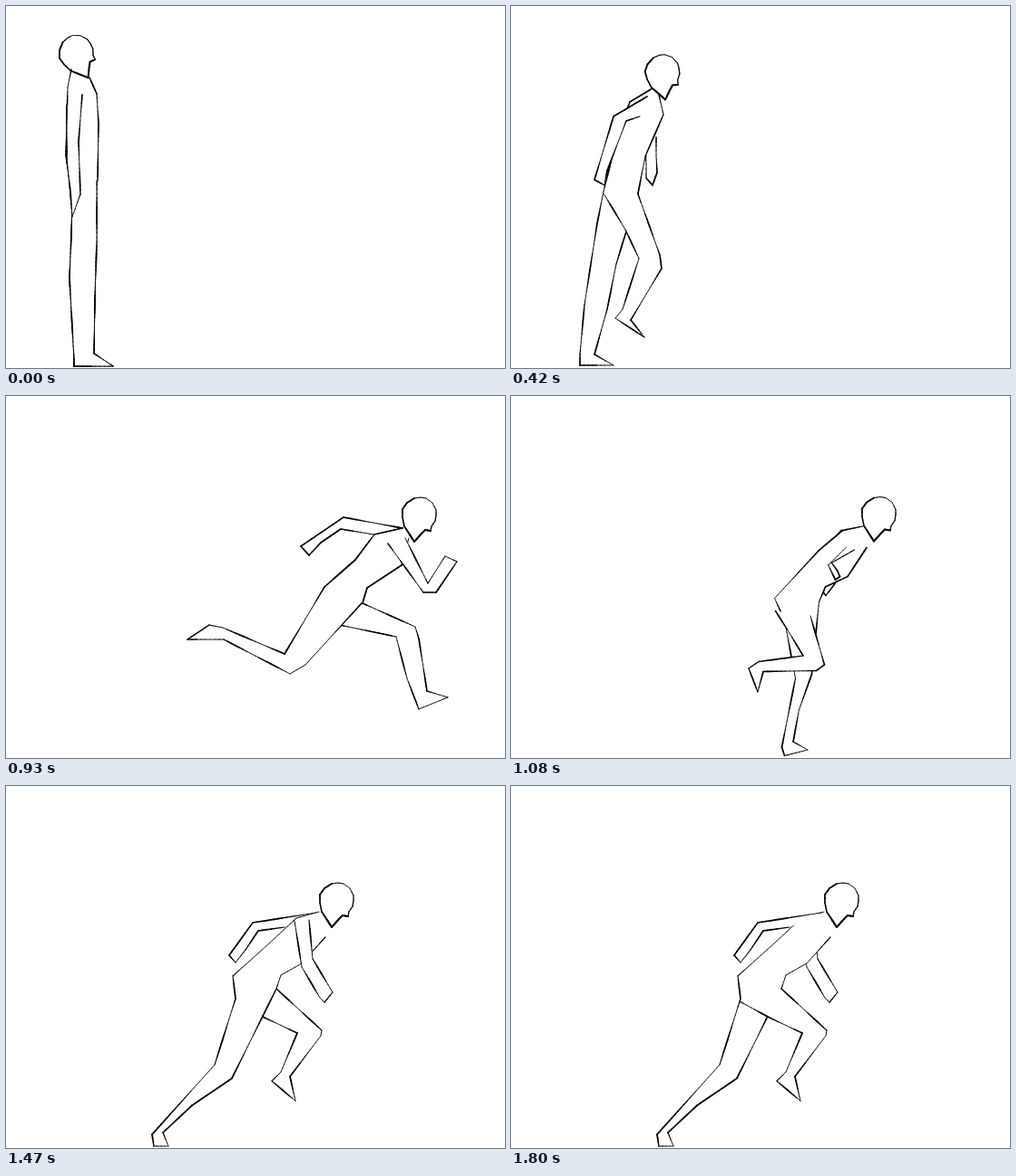
Animation, 550 px wide and 400 px high, one loop 1.86 s. Source, as an HTML page with a canvas:

```html
<!DOCTYPE html>
<html lang="en">
<head>
<meta charset="utf-8">
<title>Sprint</title>
<style>
html, body { margin: 0; overflow: hidden; background: #fff; }
canvas { display: block; }
</style>
</head>
<body>
<canvas id="stage" width="550" height="400"></canvas>
<script>
const ctx = document.getElementById('stage').getContext('2d');

// Limbs run down the back edge and up the front edge; side A is the pushing leg.
const stand = {
  head: [80, 56, -0.62],
  back: [72, 70, 68, 90, 66, 165, 73, 215],
  front: [101, 193, 102, 130, 100, 97, 92, 79],
  armA: [67, 110, 67, 170, 71, 205, 73, 233, 82, 208, 80, 150, 84, 98],
  legA: [73, 215, 72, 255, 70, 300, 75, 390, 75, 398, 118, 398, 97, 384, 98, 320, 100, 260, 100, 193]
};
stand.armB = stand.armA;
stand.legB = stand.legA;

const crouch = {
  head: [168, 78, -0.28],
  back: [156, 91, 131, 106, 118, 140, 102, 205],
  front: [139, 212, 148, 166, 168, 120, 163, 98],
  armA: [148, 150, 149, 175, 149, 190, 156, 198, 161, 184, 160, 165, 160, 145],
  armB: [150, 100, 113, 122, 92, 192, 103, 198, 106, 182, 127, 127, 142, 122],
  legA: [102, 205, 95, 240, 81, 330, 76, 385, 76, 397, 113, 397, 92, 385, 106, 335, 116, 285, 139, 210],
  legB: [102, 207, 126, 247, 141, 279, 123, 335, 115, 345, 147, 366, 132, 347, 166, 290, 164, 275, 140, 208]
};

const contact = {
  head: [446, 140, 0],
  back: [430, 149, 411, 151, 389, 167, 331, 237],
  front: [381, 231, 390, 213, 416, 203, 432, 168],
  armA: [410, 148, 358, 153, 335, 190, 343, 202, 354, 187, 365, 162, 391, 161],
  armB: [415, 200, 427, 222, 469, 219, 472, 204, 456, 206, 428, 207, 432, 178],
  legA: [331, 237, 350, 260, 397, 316, 436, 391, 440, 397, 475, 384, 449, 381, 430, 340, 414, 292, 381, 231],
  legB: [331, 237, 329, 268, 323, 301, 243, 271, 231, 276, 225, 306, 243, 288, 326, 331, 343, 324, 362, 262]
};

const push = {
  head: [364, 131, 0],
  back: [345, 139, 320, 146, 290, 174, 250, 210],
  front: [298, 224, 303, 209, 326, 196, 352, 167],
  armA: [318, 149, 326, 200, 346, 234, 351, 239, 360, 228, 338, 191, 334, 148],
  armB: [342, 140, 272, 151, 246, 187, 253, 195, 264, 181, 278, 160, 307, 156],
  legA: [250, 210, 253, 235, 230, 308, 161, 385, 163, 398, 179, 398, 173, 383, 205, 353, 249, 323, 298, 224],
  legB: [252, 238, 285, 256, 321, 273, 303, 316, 293, 326, 319, 348, 313, 321, 347, 276, 348, 270, 298, 224]
};

const flight = {
  head: [455, 136, 0],
  back: [437, 146, 406, 153, 385, 181, 351, 211],
  front: [393, 229, 398, 212, 436, 187, 444, 157],
  armA: [421, 163, 460, 217, 474, 217, 497, 183, 484, 177, 465, 207, 440, 157],
  armB: [437, 146, 372, 134, 325, 166, 334, 176, 347, 162, 369, 147, 405, 153],
  legA: [351, 211, 335, 238, 307, 285, 239, 256, 224, 253, 200, 269, 240, 269, 313, 307, 330, 297, 392, 229],
  legB: [351, 211, 363, 252, 430, 266, 442, 312, 455, 346, 487, 333, 464, 326, 455, 268, 451, 255, 393, 229]
};

const mix = (p, q, k) => Object.fromEntries(Object.keys(p).map(
  part => [part, p[part].map((v, i) => v + (q[part][i] - v) * k)]));

const middle = mix(contact, push, 0.5);
const reach = mix(push, flight, 0.5);
// Straighten the trailing leg by stretching it away from the hip.
reach.legA = reach.legA.map((v, i, leg) => leg[i % 2] + (v - leg[i % 2]) * 1.3);

const cycle = near => [
  [60, contact, near], [60, middle, near], [60, push, near],
  [60, reach, near, 0, -12], [90, flight, near]
];
const timeline = [
  [210, stand, 'B'], [120, mix(stand, crouch, 0.3), 'B'], [90, mix(stand, crouch, 0.65), 'B'],
  [60, crouch, 'B'], [60, push, 'B', -75], [60, reach, 'B', -35, -12], [90, flight, 'B'],
  ...cycle('A'), ...cycle('B'), ...cycle('A'), ...cycle('B').slice(0, 3)
];
const LOOP = timeline.reduce((sum, [ms]) => sum + ms, 0);

// Draw in short steps whose width varies like a pen line.
function ink(points, weight = 1.3, swing = 0.45) {
  for (let i = 0; i + 3 < points.length; i += 2) {
    const [x0, y0, x1, y1] = points.slice(i, i + 4);
    const steps = Math.ceil(Math.hypot(x1 - x0, y1 - y0) / 5);
    const at = k => [x0 + (x1 - x0) * k / steps, y0 + (y1 - y0) * k / steps];
    for (let k = 0; k < steps; k++) {
      const [x, y] = at(k);
      ctx.lineWidth = weight + swing * Math.sin(x * 0.09 + y * 0.13);
      ctx.beginPath();
      ctx.moveTo(x, y);
      ctx.lineTo(...at(k + 1));
      ctx.stroke();
    }
  }
}

function fill(points) {
  ctx.beginPath();
  for (let i = 0; i < points.length; i += 2) ctx.lineTo(points[i], points[i + 1]);
  ctx.fill();
}

function limb(points) {
  fill(points);
  ink(points);
}

function drawHead([x, y, turn]) {
  ctx.translate(x, y);
  ctx.rotate(turn);
  ink([-5, -23, 2, -24, 8, -23, 15, -18, 19, -10, 19, -4, 18, 2, 14, 8, 13, 13], 1.1, 0.2);
  ink([-5, -23, -13, -18, -18, -11, -18, -2, -16, 8, -12, 14, -5, 25, 3, 16, 7, 12, 13, 13], 1.8, 0.3);
}

function drawFigure(pose, near, dx = 0, dy = 0) {
  const far = near === 'A' ? 'B' : 'A';
  ctx.setTransform(1, 0, 0, 1, 0, 0);
  ctx.fillStyle = '#fff';
  ctx.fillRect(0, 0, 550, 400);
  ctx.lineCap = 'round';
  ctx.translate(dx, dy);
  limb(pose['arm' + far]);
  limb(pose['leg' + far]);
  fill([...pose.back, ...pose.front]);
  ink(pose.back);
  ink(pose.front);
  limb(pose['leg' + near]);
  limb(pose['arm' + near]);
  drawHead(pose.head);
}

function tick() {
  let t = performance.now() % LOOP;
  const [, ...figure] = timeline.find(([ms]) => (t -= ms) < 0);
  drawFigure(...figure);
  requestAnimationFrame(tick);
}
tick();
</script>
</body>
</html>
```
